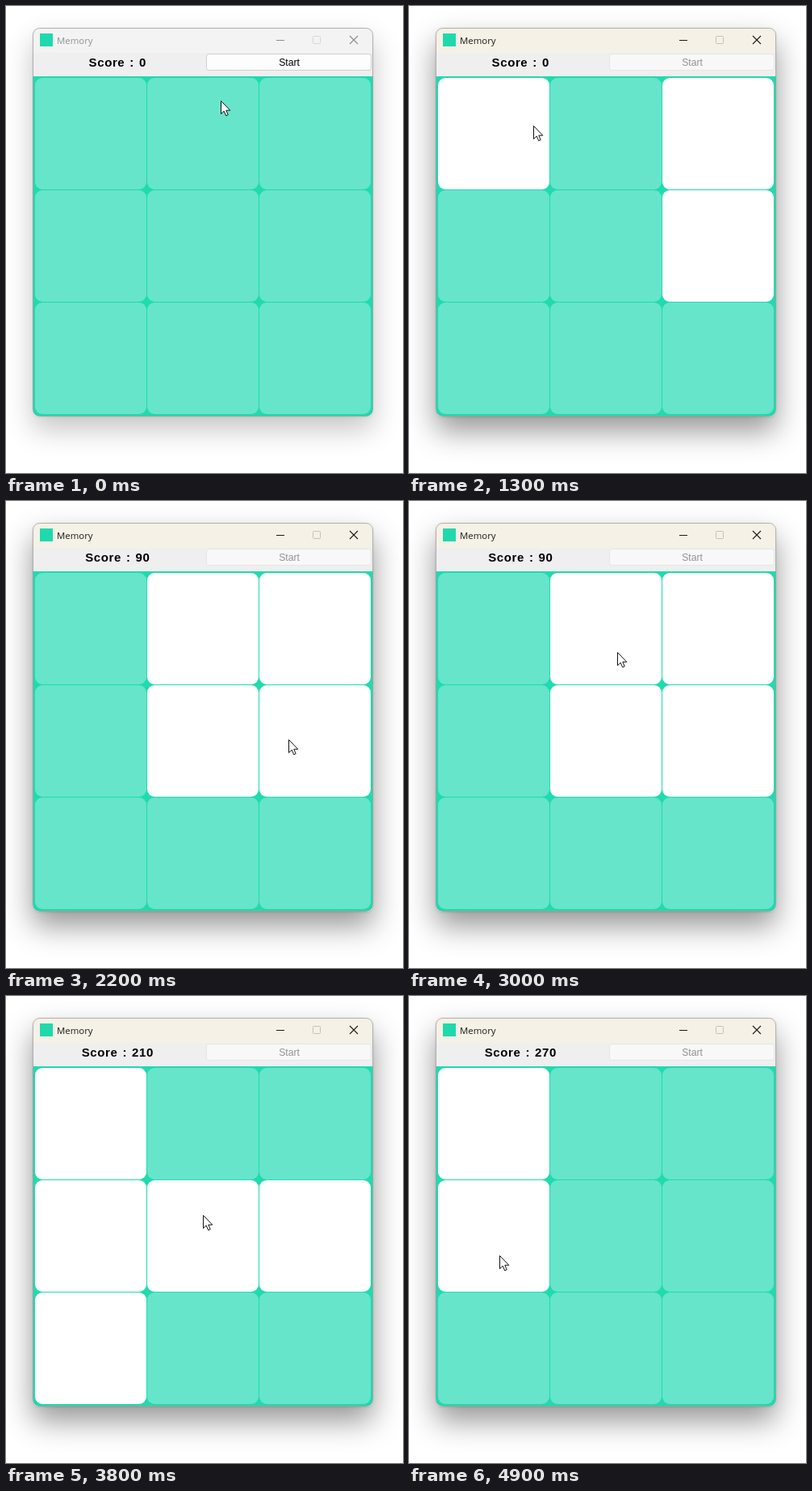
An HTML page for the animation above (5000 ms loop, 492 px wide and 578 px high).

```html
<!DOCTYPE html>
<html lang="en">
<head>
<meta charset="utf-8">
<title>Memory</title>
<style>
  html, body { margin: 0; width: 100%; height: 100%; overflow: hidden; background: #fff; }
  #stage { position: relative; width: 492px; height: 578px; overflow: hidden; background: #fff; }
  #shadow { position: absolute; left: 33px; top: 27px; width: 422px; height: 481px; border-radius: 8px; }
  svg { position: absolute; left: 0; top: 0; display: block; }
  .title { font: 11.4px "Open Sans", "Noto Sans", sans-serif; }
  .score { font: bold 15px "Liberation Sans", Arial, sans-serif; letter-spacing: .6px; word-spacing: 1.3px; }
  .start { font: 12.2px "Liberation Sans", Arial, sans-serif; }
</style>
</head>
<body>
<div id="stage">
  <div id="shadow"></div>
  <svg width="492" height="578" viewBox="0 0 492 578">
    <clipPath id="frame"><rect x="33.5" y="27.5" width="421" height="480" rx="8"/></clipPath>
    <g clip-path="url(#frame)">
      <rect id="bar" x="33" y="27" width="422" height="32"/>
      <rect x="33" y="58" width="422" height="29" fill="#efefef"/>
      <rect x="33" y="87" width="422" height="421" fill="#1fdbae"/>
      <g id="cells"></g>
    </g>
    <rect x="33.5" y="27.5" width="421" height="480" rx="8" fill="none" stroke="#808080" stroke-opacity=".6"/>
    <rect x="42" y="34" width="16" height="16" fill="#1fd9ad"/>
    <text id="title" class="title" x="63" y="47">Memory</text>
    <g fill="none">
      <path id="controls" d="M335 42.5h10M426 37l10 10M436 37l-10 10" stroke-width="1.1"/>
      <rect id="maximise" x="380.5" y="37.5" width="9" height="9" rx="1"/>
    </g>
    <text id="score" class="score" x="138.3" y="75" text-anchor="middle"></text>
    <rect id="button" x="248.5" y="59.5" width="204" height="20" rx="3"/>
    <text id="start" class="start" x="351" y="74" text-anchor="middle">Start</text>
    <path id="cursor" d="M.5.5V16.6L4.2 13.1 6.7 18.8 9.2 17.7 6.8 12.2H11.8Z" fill="#fff" stroke="#111" stroke-linejoin="round"/>
  </svg>
</div>
<script>
const LOOP = 5000, STEP = 100, START = 500;
const $ = id => document.getElementById(id);
const set = (id, attrs) => {
  for (const k in attrs) $(id).setAttribute(k, attrs[k]);
};

// time, lit cells, score
const rounds = [
  [0, "", 0], [600, "025", 0], [1500, "", 0], [1700, "0", 30], [2000, "02", 60],
  [2200, "1245", 90], [3100, "", 90], [3200, "1", 120], [3400, "12", 150],
  [3600, "125", 180], [3700, "03456", 210], [4600, "", 210], [4700, "0", 240],
  [4900, "03", 270]
];

// time, x, y of the pointer tip
const path = [
  [0, 266, 117], [400, 328, 71], [600, 331, 69], [1100, 165, 138], [1300, 154, 148],
  [1700, 138, 152], [1900, 347, 153], [2000, 350, 166], [2200, 350, 295],
  [2400, 339, 256], [2800, 262, 200], [2900, 262, 200], [3200, 250, 162],
  [3400, 361, 171], [3600, 352, 266], [3700, 272, 280], [3900, 215, 262],
  [4000, 215, 262], [4500, 122, 203], [4700, 114, 182], [4900, 112, 321]
];

const cells = Array.from({ length: 9 }, (_, i) => {
  const r = document.createElementNS("http://www.w3.org/2000/svg", "rect");
  const attrs = { x: 36 + i % 3 * 139, y: 89 + Math.floor(i / 3) * 139, width: 138, height: 138, rx: 9 };
  for (const k in attrs) r.setAttribute(k, attrs[k]);
  return $("cells").appendChild(r);
});

function pointer(t) {
  const i = path.findIndex(p => p[0] > t);
  if (i < 0) return path[path.length - 1].slice(1);
  const [a, b] = [path[i - 1], path[i]];
  const k = (t - a[0]) / (b[0] - a[0]);
  return [1, 2].map(n => Math.round(a[n] + (b[n] - a[n]) * k));
}

function draw(t) {
  const active = t >= START;
  const [, lit, score] = rounds.filter(r => r[0] <= t).pop();
  cells.forEach((c, i) => c.setAttribute("fill", lit.includes(i) ? "#fff" : "#66e5cb"));
  $("score").textContent = "Score : " + score;
  set("bar", { fill: active ? "#f5f1e6" : "#f3f3f3" });
  set("title", { fill: active ? "#1a1a1a" : "#919191" });
  set("controls", { stroke: active ? "#1a1a1a" : "#8c8c8c" });
  set("maximise", { stroke: active ? "#c5c1b8" : "#d6d6d6" });
  set("button", { fill: active ? "#f8f8f8" : "#fdfdfd", stroke: active ? "#e6e6e6" : "#d0d0d0" });
  set("start", { fill: active ? "#929292" : "#000" });
  $("shadow").style.boxShadow = active
    ? "0 18px 36px rgba(0,0,0,.41), 0 1px 3px rgba(0,0,0,.12)"
    : "0 16px 34px rgba(0,0,0,.23), 0 1px 3px rgba(0,0,0,.08)";
  set("cursor", { transform: `translate(${pointer(t)})` });
}

let begin, last;
function tick(now) {
  begin ??= now;
  const t = Math.floor((now - begin) % LOOP / STEP) * STEP;
  if (t !== last) draw(last = t);
  requestAnimationFrame(tick);
}
draw(0);
requestAnimationFrame(tick);
</script>
</body>
</html>
```
